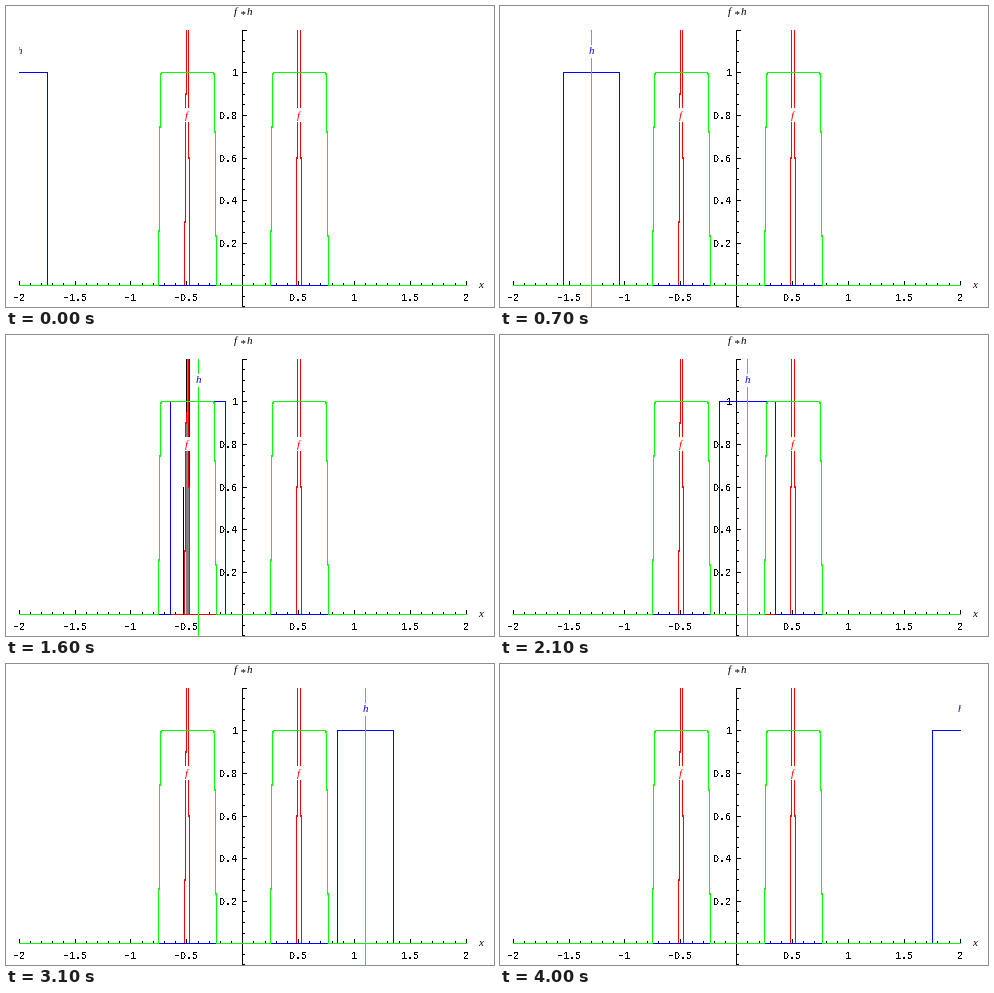
A matplotlib script for the animation above (4100 ms loop, 488 px wide and 301 px high).

```python
import numpy as np
import matplotlib.pyplot as plt
from matplotlib.animation import FuncAnimation
from matplotlib.patches import Rectangle

W, H, DPI = 488, 301, 64
PX = 72 / DPI
FRAMES, INTERVAL = 41, 100
LEFT, RIGHT, TOP, BASE, BOTTOM = 13, 460, 24, 279, 300
ONE = 66
BLUE, RED, GREEN, GRAY = "#0000ff", "#ff0000", "#00ff00", "#808080"

fig = plt.figure(figsize=(W / DPI, H / DPI), dpi=DPI, facecolor="white")
ax = fig.add_axes([0, 0, 1, 1])
ax.set_xlim(0, W)
ax.set_ylim(H, 0)
ax.axis("off")


def px(x):
    return round(236.2 + 111.75 * x)


def py(y):
    return round(279.2 - 212.8 * y)


def trace(points):
    """Walk a polyline pixel by pixel, through pixel centres."""
    xs, ys = [], []
    for (x0, y0), (x1, y1) in zip(points, points[1:]):
        n = max(abs(x1 - x0), abs(y1 - y0)) + 1
        xs.append(np.round(np.linspace(x0, x1, n)) + 0.5)
        ys.append(np.round(np.linspace(y0, y1, n)) + 0.5)
    return np.concatenate(xs), np.concatenate(ys)


def line(points, color, z):
    # Thinner than a pixel, so that only the pixel it runs through is set
    return ax.plot(*trace(points), color=color, lw=0.5 * PX, aa=False,
                   snap=False, zorder=z, solid_capstyle="projecting")[0]


def italic(x, y, s, color="black", z=2):
    return ax.text(x, y, s, color=color, zorder=z, ha="center", va="baseline",
                   fontsize=11 * PX, family="Liberation Serif", style="italic")


def number(x, y, value, ha="center"):
    # The letter O stands in for a zero without a dot
    s = f"{value:g}".replace("-", "\u2212").replace("0", "O")
    ax.text(x, y, s, ha=ha, va="baseline", fontsize=10 * PX, zorder=2,
            family="Liberation Mono", antialiased=False)


def box(x, y, w, h, color, z):
    return ax.add_patch(Rectangle((x, y), w, h, fc=color, lw=0, aa=False,
                                  zorder=z))


# Axes
line([(LEFT, BASE), (RIGHT, BASE)], "black", 1)
line([(236, TOP), (236, BOTTOM)], "black", 1)
for k in range(-20, 21):
    x = px(k / 10)
    major = k % 5 == 0
    line([(x, BASE), (x, BASE - (4 if major else 2))], "black", 1)
    if major and k:
        number(x + 0.5, 295, k / 10)
for k in range(-2, 25):
    y = py(k / 20)
    major = k % 4 == 0
    line([(236, y), (236 + (4 if major else 2), y)], "black", 1)
    if major and 0 < k < 24:
        number(232, y + 4, k / 20, ha="right")
italic(475, 282, "x")
italic(229.5, 9, "f")
italic(237, 11, "*")
italic(243.5, 9, "h")

# Narrow pulses and their convolution with the box
pulses = [(178, 180, 183, 182), (290, 291, 295, 294)]
line([(LEFT, BASE), (RIGHT, BASE)], RED, 4)
for a, b, c, d in pulses:
    line([(a, BASE), (b, TOP)], RED, 4)
    line([(c, BASE), (d, TOP)], RED, 4)

curve = [(LEFT, BASE)]
for x in (152, 264):
    curve += [(x, BASE), (x + 1, 170), (x + 2, 70), (x + 3, ONE),
              (x + 55, ONE), (x + 56, 70), (x + 57, 180), (x + 58, BASE)]
line(curve + [(RIGHT, BASE)], GREEN, 6)

for x in (180, 292):
    box(x - 4, 102, 11, 14, "white", 7)
    italic(x + 0.5, 113, "f", RED, 8)

# Shaded product where the box covers a pulse
shades = []
for a, b, c, d in pulses:
    shades.append([
        box(b, TOP, d - b + 1, BASE - TOP, GRAY, 3),
        line([(b, TOP), (b, 76)], "black", 4.5),
        line([(a - 1, 152), (a - 1, BASE)], "black", 4.5),
        line([(c, TOP), (c, BASE)], "black", 3.5),
    ])

# Sliding box
pulse = line([(LEFT, BASE), (RIGHT, BASE)], BLUE, 5)
guide = line([(LEFT, TOP), (LEFT, BOTTOM)], GREEN, 6.5)
patch = box(0, 39, 11, 13, "white", 8)
name = italic(0, 48, "h", BLUE, 9)
window = Rectangle((LEFT, 0), RIGHT - LEFT + 1, H, transform=ax.transData)
for artist in (pulse, guide, patch, name):
    artist.set_clip_path(window)
    artist.set_clip_on(True)


def update(i):
    c = (i - 20) / 10
    left, mid, right = px(c - 0.25), px(c), px(c + 0.25)
    pulse.set_data(*trace([(LEFT, BASE), (left, BASE), (left, ONE),
                           (right, ONE), (right, BASE), (RIGHT, BASE)]))
    guide.set_data(*trace([(mid, TOP), (mid, BOTTOM)]))
    guide.set_visible(abs(c) < 2)
    patch.set_x(mid - 5)
    name.set_x(mid + 0.5)
    for centre, parts in zip((-0.5, 0.5), shades):
        for part in parts:
            part.set_visible(abs(c - centre) < 0.25)
    return []


anim = FuncAnimation(fig, update, frames=FRAMES, interval=INTERVAL,
                     repeat=True, repeat_delay=0, init_func=lambda: update(0))
plt.show()
```
